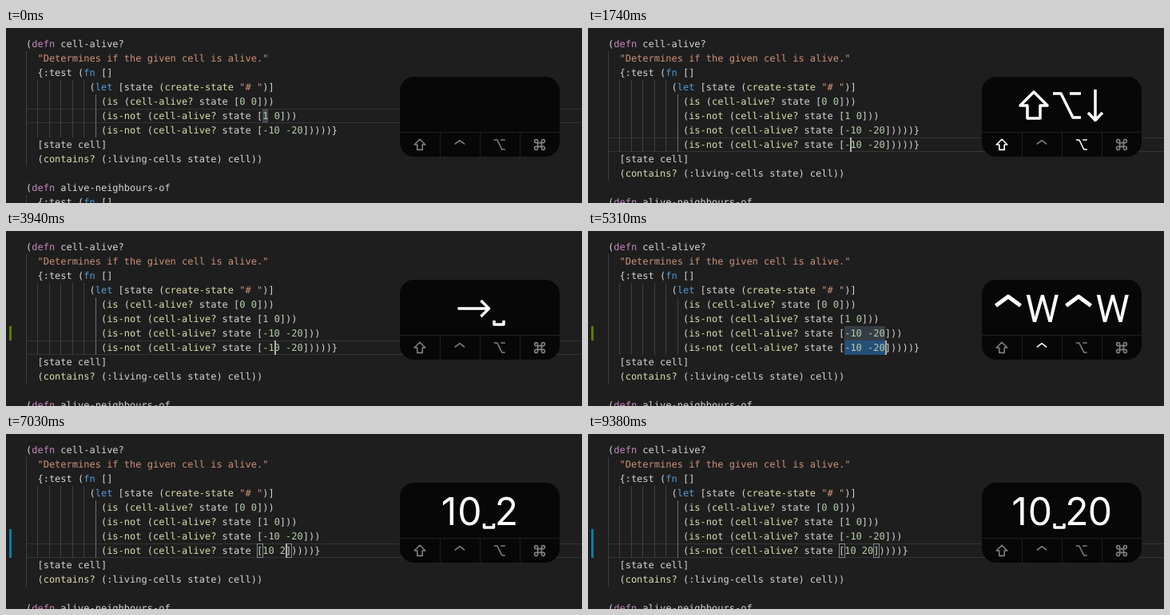
These frames come from a looping animation (721x219 px, 9.43 s). An HTML page:

```html
<!DOCTYPE html>
<html>
<head>
<meta charset="utf-8">
<style>
html, body { margin: 0; width: 100%; height: 100%; overflow: hidden; background: #1e1e1e; }
svg { display: block; }
text { white-space: pre; text-rendering: geometricPrecision; }
.code { font: 12px "DejaVu Sans Mono", monospace; }
.key { font: 48px Inter, sans-serif; fill: #fff; text-anchor: middle; }
.wide { font-family: Roboto, sans-serif; }
path { fill: none; stroke-linejoin: round; }
</style>
</head>
<body>
<svg id="stage" width="721" height="219" viewBox="0 0 721 219"></svg>
<script>
const LOOP = 9430, CHAR = 7.224, LEFT = 25, ROW = 18, TOP = 11;
const stage = document.getElementById('stage');
const pad = ' '.repeat(13);
const call = pad + '(is-not (cell-alive? state [';

// Each step changes only the listed properties.
const steps = [
  [0, {row: 5, col: 42, on: 0, marks: [[5, 41, 1]], sel: 0, keys: '', mods: '', arg: '-10 -20'}],
  [50, {on: 1}],
  [530, {on: 0}],
  [880, {row: 6, on: 1, marks: [], keys: '↓'}],
  [1150, {marks: [[6, 41, 3]]}],
  [1330, {keys: '', mods: '⇧'}],
  [1390, {mods: '⇧⌥', on: 0}],
  [1690, {copied: 1, row: 7, on: 1, marks: []}],
  [1740, {keys: '⇧⌥↓'}],
  [2010, {bar: [7, 1, '#587c0c']}],
  [2130, {keys: '', mods: ''}],
  [2190, {on: 0}],
  [2720, {on: 1}],
  [3230, {on: 0}],
  [3350, {on: 1, col: 43, keys: '→'}],
  [3700, {balanced: 1, keys: '→␣'}],
  [3940, {bar: [6, 1, '#587c0c']}],
  [4840, {keys: '', mods: '^'}],
  [4960, {sel: 3, col: 44, marks: [[6, 41, 3]], keys: '^W'}],
  [5310, {sel: 7, col: 48, marks: [[6, 41, 7]], keys: '^W^W'}],
  [5490, {keys: '', mods: ''}],
  [5790, {on: 0}],
  [6330, {on: 1}],
  [6500, {sel: 0, marks: [], arg: '1', col: 42, brackets: 1}],
  [6560, {keys: '1'}],
  [6730, {arg: '10', col: 43, keys: '10'}],
  [6850, {arg: '10 ', col: 44, keys: '10␣', bar: [6, 2, '#0c7d9d']}],
  [7030, {arg: '10 2', col: 45, keys: '10␣2'}],
  [7150, {arg: '10 20', col: 46, keys: '10␣20'}],
  [7630, {on: 0}],
  [8130, {on: 1}],
  [8670, {on: 0}],
  [9140, {on: 1}],
  [9380, {on: 0}]
];

const shapes = {
  '^': 'M5.5 93.5L21 82L36.5 93.5',
  '␣': 'M2.5 112V117H14.5V112',
  '↓': 'M14 77V115M5 106L14 115.5L23 106',
  '→': 'M5 97H44M34 87L44 97L34 107',
  '⇧': 'M21 80L38 97H29V113H13V97H4Z',
  '⌥': 'M3 82H13L28 112H38M24 82H38',
  '⌘': 'M15 91h12v12h-12zM15 91h-5a5 5 0 1 1 5-5zM27 91v-5a5 5 0 1 1 5 5z' +
       'M27 103h5a5 5 0 1 1-5 5zM15 103v5a5 5 0 1 1-5-5z'
};
const widths = {'^': 41, '␣': 17, '↓': 28, '→': 48, '⇧': 42, '⌥': 42, W: 47, 1: 23, 2: 29, 0: 29};

const colX = c => LEFT + c * CHAR;
const rowY = r => TOP + r * ROW;
const rect = (x, y, w, h, fill, more = '') =>
  `<rect x="${x}" y="${y}" width="${w}" height="${h}" fill="${fill}" ${more}/>`;
const cells = (row, col, n, fill) =>
  rect(Math.round(colX(col)), rowY(row), Math.round(n * CHAR), ROW, fill);

function colour(token, before) {
  if (token[0] === '"') return '#ce9178';
  if (/^-?\d/.test(token)) return '#b5cea8';
  if (before !== '(') return '#d4d4d4';
  if (token === 'defn') return '#c586c0';
  if (token === 'let' || token === 'fn') return '#569cd6';
  return /^[a-z]/.test(token) ? '#dcdcaa' : '#d4d4d4';
}

function codeLine(line, row) {
  let out = '';
  for (const m of line.matchAll(/"[^"]*"|[^\s"()[\]{}]+|[()[\]{}]/g)) {
    out += `<tspan x="${colX(m.index)}" fill="${colour(m[0], line[m.index - 1])}">${m[0]}</tspan>`;
  }
  return `<text class="code" y="${rowY(row) + 13}">${out}</text>`;
}

function codeLines(s) {
  const last = call + s.arg + ']))))}';
  const first = call + '-10 -20]))' + (s.balanced ? '' : '))}');
  return [
    '(defn cell-alive?',
    '  "Determines if the given cell is alive."',
    '  {:test (fn []',
    '           (let [state (create-state "# ")]',
    pad + '(is (cell-alive? state [0 0]))',
    call + '1 0]))',
    first,
    ...(s.copied ? [last] : []),
    '  [state cell]',
    '  (contains? (:living-cells state) cell))',
    '',
    '(defn alive-neighbours-of',
    '  {:test (fn []'
  ];
}

function editor(s) {
  const lines = codeLines(s);
  const y = rowY(s.row);
  let out = '';
  if (!s.sel) out += rect(LEFT, y, 696, 1, '#343434') + rect(LEFT, y + ROW - 1, 696, 1, '#343434');
  lines.forEach((line, r) => {
    const indent = line.search(/\S/);
    for (let c = 0; c < indent; c += 2) {
      out += rect(Math.round(colX(c)), rowY(r), 1, ROW, c === 12 && !s.sel ? '#707070' : '#404040');
    }
  });
  for (const [r, c, n] of s.marks) out += cells(r, c, n, s.sel ? '#363c43' : '#414a50');
  if (s.sel) out += cells(7, 41, s.sel, '#264f78');
  if (s.bar) out += rect(4, rowY(s.bar[0]), 3, ROW * s.bar[1], s.bar[2]);
  lines.forEach((line, r) => out += codeLine(line, r));
  if (s.brackets) {
    for (const c of [40, 41 + s.arg.length]) {
      out += rect(Math.round(colX(c)) + .5, y + .5, 7, 17, 'none', 'stroke="#888"');
    }
  }
  if (s.on) out += rect(Math.round(colX(s.col)), y, 2, ROW, '#aeafad');
  return out;
}

function bigKeys(keys) {
  let x = 593 - [...keys].reduce((sum, k) => sum + widths[k], 0) / 2;
  let out = '';
  for (const k of keys) {
    out += shapes[k]
      ? `<path d="${shapes[k]}" transform="translate(${x})" stroke="#fff" stroke-width="${k === '^' ? 5 : 3.5}"/>`
      : `<text class="key${k === 'W' ? ' wide' : ''}" x="${x + widths[k] / 2 - 1}" y="114">${k}</text>`;
    x += widths[k];
  }
  return out;
}

function panel(s) {
  let out = rect(493, 61, 200, 100, '#070707', 'rx="18"') + rect(493, 130, 200, 1, '#202020');
  [...'⇧^⌥⌘'].forEach((k, i) => {
    const x = 518 + 50 * i;
    const place = k === '^' ? `${x} 143) scale(.4) translate(-21 -87.7` : `${x} 146) scale(.4) translate(-21 -97`;
    if (i) out += rect(x - 25, 131, 1, 30, '#202020');
    out += `<path d="${shapes[k]}" transform="translate(${place})" stroke="${s.mods.includes(k) ? '#fff' : '#808080'}" stroke-width="4"/>`;
  });
  return out + bigKeys(s.keys);
}

let shown = -1;
function draw(now) {
  const t = now % LOOP;
  const count = steps.filter(step => step[0] <= t).length;
  if (count !== shown) {
    const s = Object.assign({}, ...steps.slice(0, count).map(step => step[1]));
    stage.innerHTML = editor(s) + panel(s);
    shown = count;
  }
}

const start = performance.now();
function tick() {
  draw(performance.now() - start);
  requestAnimationFrame(tick);
}
tick();
</script>
</body>
</html>
```
